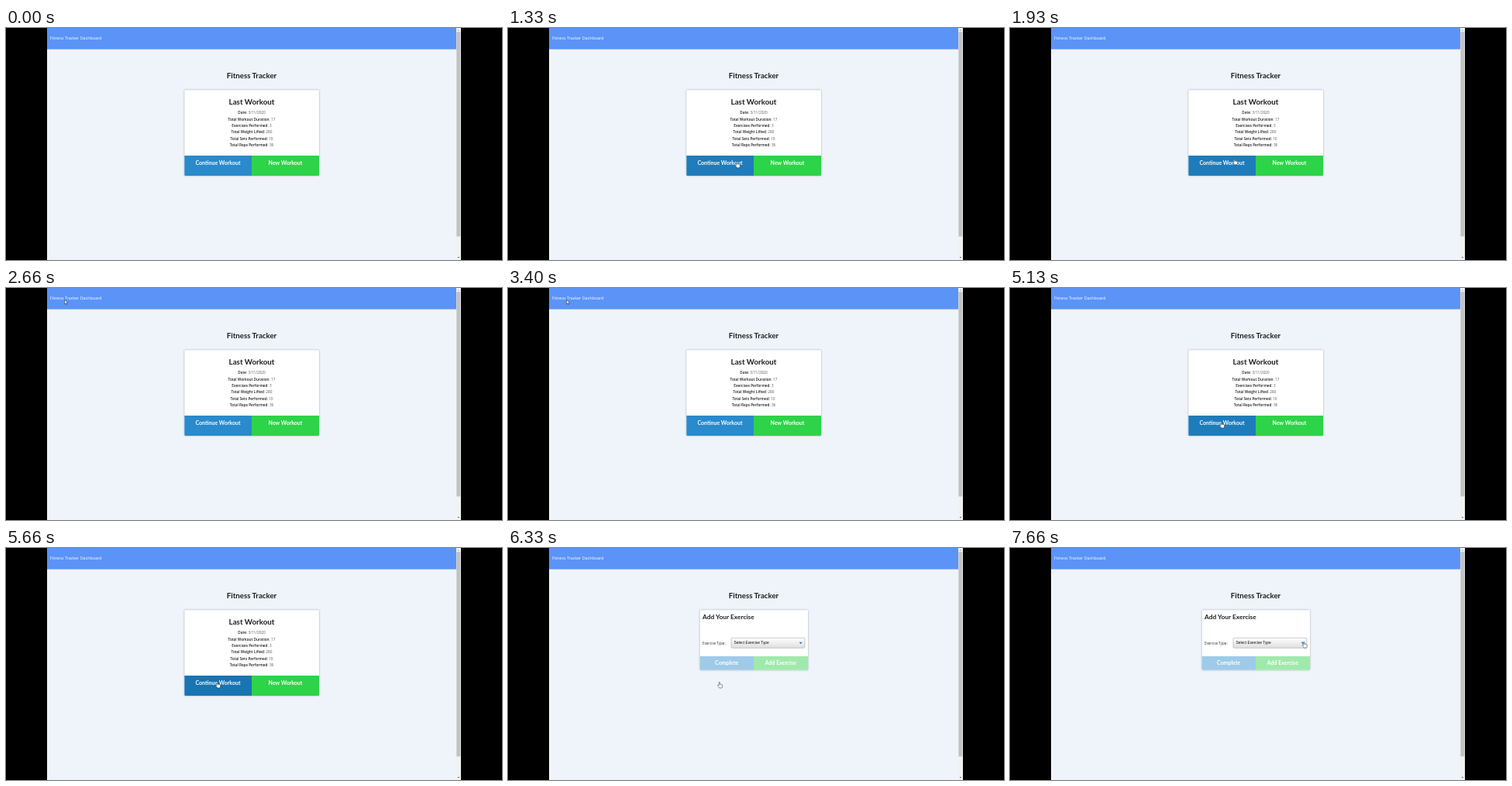
Write an HTML page that moves like this. It is 640 px wide and 300 px high and loops after 8 s.

```html
<!DOCTYPE html>
<html lang="en">
<head>
<meta charset="utf-8">
<title>Fitness Tracker</title>
<style>
  html, body { margin: 0; width: 100%; height: 100%; overflow: hidden; background: #000; }
  svg { display: block; width: 640px; height: 300px; }
  text { font-family: Lato, sans-serif; font-weight: 700; fill: #1d1f22; }
  .mid text, text.mid { text-anchor: middle; }
  .ui, .stats text { font-family: "Open Sans", sans-serif; font-weight: 400; }
  .stats text { font-size: 4.7px; fill: #555; }
  .stats .label { font-weight: 600; fill: #1d1f22; }
  .button { font-size: 7px; fill: #fff; }
  .card { fill: #fff; filter: drop-shadow(0 .4px .8px #0005); }
</style>
</head>
<body>
<svg viewBox="0 0 640 300">
  <defs>
    <linearGradient id="selectFill" x2="0" y2="1">
      <stop stop-color="#fff"/><stop offset="1" stop-color="#dedede"/>
    </linearGradient>
  </defs>
  <rect width="640" height="300"/>
  <rect x="53" width="534" height="300" fill="#eff4fb"/>
  <rect x="53" width="528" height="27.5" fill="#5b93f7"/>
  <text class="ui" x="57" y="14.8" font-size="5.4" style="fill:#fff">Fitness Tracker Dashboard</text>

  <rect x="581" width="5.7" height="300" fill="#f1f1f1"/>
  <rect x="581.4" y="5" width="4.9" height="264.5" fill="#c1c1c1"/>
  <path d="M582.7 3.4h2.4l-1.2-1.5z" fill="#a3a3a3"/>
  <path d="M582.7 296h2.4l-1.2 1.5z" fill="#505050"/>

  <text class="mid" x="317" y="65.4" font-size="9.7">Fitness Tracker</text>

  <g id="home" class="mid">
    <rect class="card" x="230.3" y="80.2" width="173.7" height="110.8" rx="1"/>
    <text x="317" y="98.5" font-size="9.75">Last Workout</text>
    <g id="stats" class="stats"></g>
    <path id="continue" d="M230.3 165H317v26h-85.7q-1 0-1-1z"/>
    <path d="M317 165h87v25q0 1-1 1h-86z" fill="#2dd348"/>
    <text class="button" x="273.5" y="176.6">Continue Workout</text>
    <text class="button" x="360.5" y="176.6">New Workout</text>
  </g>

  <g id="form">
    <rect class="card" x="247.7" y="80.2" width="139.3" height="77.6" rx="1"/>
    <text x="251" y="91.8" font-size="8.4">Add Your Exercise</text>
    <text class="ui" x="251" y="124.7" font-size="4.55" style="fill:#333">Exercise Type:</text>
    <rect x="288" y="116.3" width="95" height="13" rx="1.2" fill="url(#selectFill)" stroke="#aaa" stroke-width=".6"/>
    <text x="291.6" y="124.4" font-size="4.85" style="font-family:'Liberation Sans',Arial,sans-serif;font-weight:400;fill:#111">Select Exercise Type</text>
    <path d="M375.6 121.8h4.2l-2.1 2.5z" fill="#1c7fb8"/>
    <path d="M247.7 140H317v17.8h-68.3q-1 0-1-1z" fill="#9fcae8"/>
    <path d="M317 140h70v16.8q0 1-1 1h-69z" fill="#a0e9ac"/>
    <g class="mid">
      <text class="button" x="282.2" y="151.4">Complete</text>
      <text class="button" x="351.8" y="151.4">Add Exercise</text>
    </g>
  </g>

  <g id="cursor" fill="#fff" stroke="#222" stroke-width=".5" stroke-linejoin="round">
    <path id="arrow" d="M0 0v5.4l1.3-1.2.9 2 .9-.4-.9-1.9h1.7z"/>
    <path id="hand" d="M-.6.5q.6-1 1.2 0v2.6q.6-.5 1.1.1.6-.4 1.1.2.7-.2 1 .5v2q0 1-.7 1.9h-3.2q-.8-1.5-2-2.7-.5-.8.2-1.1.7-.1 1.3.6z"/>
  </g>
</svg>
<script>
const LOOP = 8000, PAGE_CHANGE = 6000, PRESS = 5400, SHOWN = 330;
const $ = id => document.getElementById(id);

const stats = [["Date", "3/11/2020"], ["Total Workout Duration", 17], ["Exercises Performed", 3],
  ["Total Weight Lifted", 280], ["Total Sets Performed", 10], ["Total Reps Performed", 36]];
$("stats").innerHTML = stats.map(([label, value], i) =>
  `<text x="317" y="${111.1 + i * 8.45}"><tspan class="label">${label}</tspan>: ${value}</text>`).join("");

const smooth = u => u * u * (3 - 2 * u);
const easeIn = u => u ** 1.5;
const easeOut = u => 1 - (1 - u) ** 2;

// Pointer stops: time, x, y, easing on the way there
const path = [
  [SHOWN, 312, 205, smooth],
  [930, 295.5, 173, smooth],
  [1860, 295.5, 173, smooth],
  [2600, 75.7, 15.4, smooth],
  [3930, 75.7, 15.4, smooth],
  [4260, 198.3, 79.7, easeIn],
  [4800, 272.8, 173.2, easeOut],
  [6530, 272.8, 173.2, smooth],
  [7400, 379.5, 121.3, smooth],
  [LOOP, 379.5, 121.3, smooth]
];

function pointerAt(t) {
  const next = Math.max(1, path.findIndex(p => p[0] > t));
  const [t0, x0, y0] = path[next - 1], [t1, x1, y1, ease] = path[next];
  const u = ease(Math.max(0, (t - t0) / (t1 - t0)));
  return [x0 + (x1 - x0) * u, y0 + (y1 - y0) * u];
}

const inside = (x, y, left, top, right, bottom) => x > left && x < right && y > top && y < bottom;
const show = (id, on) => $(id).setAttribute("visibility", on ? "visible" : "hidden");

function draw(t) {
  const [x, y] = pointerAt(t), home = t < PAGE_CHANGE, visible = t >= SHOWN;
  const onContinue = home && visible && inside(x, y, 230, 165, 317, 191);
  const onHand = onContinue || !home && (t < 6530 || inside(x, y, 288, 116, 383, 130));
  show("home", home);
  show("form", !home);
  show("arrow", visible && !onHand);
  show("hand", visible && onHand);
  $("continue").setAttribute("fill", !onContinue ? "#298acc" : t < PRESS ? "#1f7cba" : "#1875b2");
  $("cursor").setAttribute("transform", `translate(${x} ${y})`);
}

function frame() {
  draw(performance.now() % LOOP);
  requestAnimationFrame(frame);
}
frame();
</script>
</body>
</html>
```
